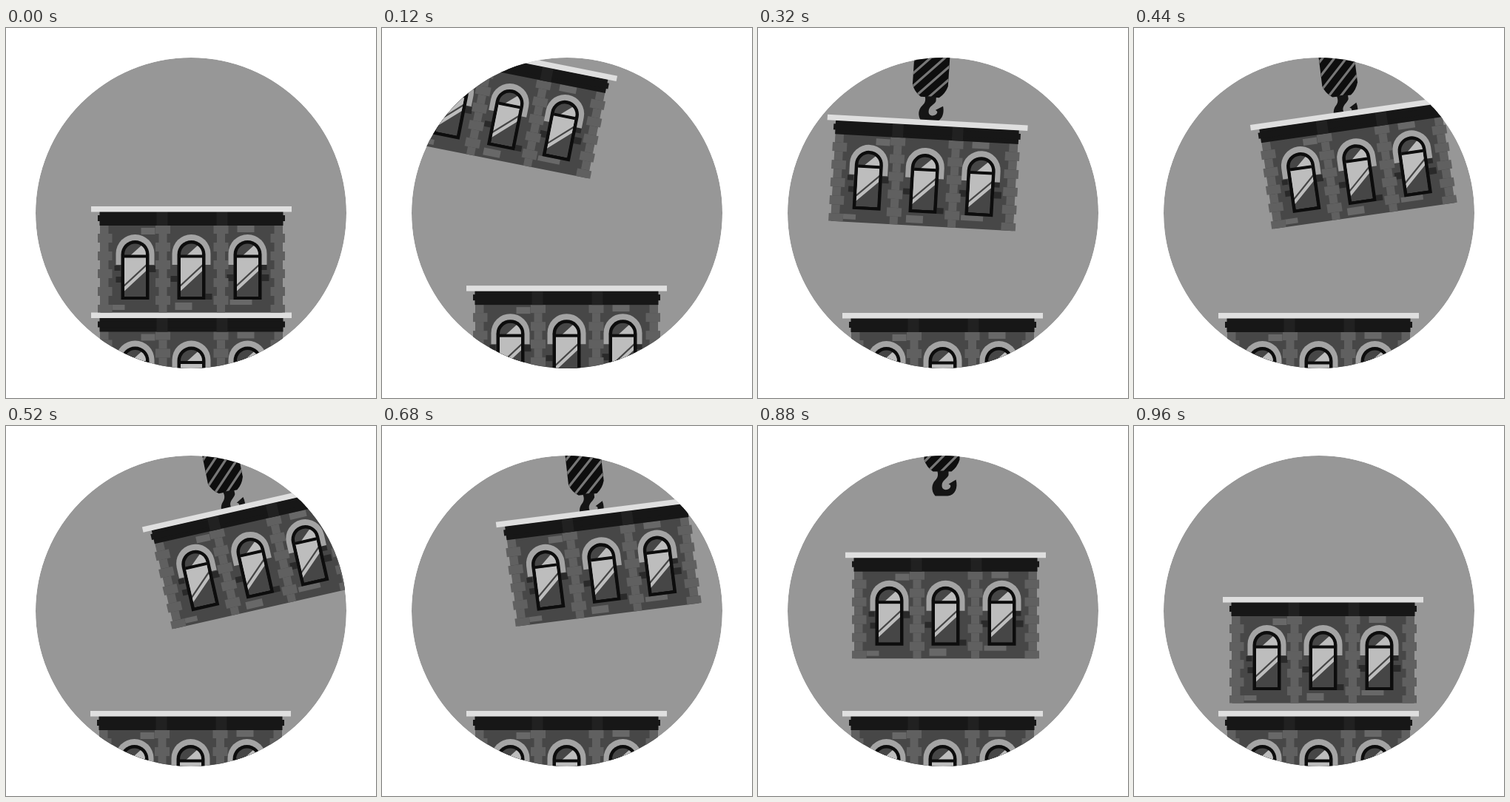
An HTML page for the animation above (1000 ms loop, 500 by 500 pixels).

```html
<!DOCTYPE html>
<html lang="en">
<head>
<meta charset="utf-8">
<title>Stacking floors</title>
<style>
html, body { margin: 0; width: 100%; height: 100%; overflow: hidden; background: #fff; }
svg { display: block; width: 100vw; height: 100vh; }
</style>
</head>
<body>
<svg viewBox="0 0 500 500">
  <defs>
    <clipPath id="disc"><circle cx="250" cy="250" r="210"/></clipPath>
    <clipPath id="tackleShape"><path id="tackle" d="M-24-110H24V-16Q21-6 13 0H-12Q-21-6-24-16Z"/></clipPath>
    <clipPath id="glass"><path d="M-14.5 122V65a14.5 14.5 0 0 1 29 0V122Z"/></clipPath>
    <g id="window">
      <path d="M-26 79V64a26 26 0 0 1 52 0V79Z" fill="#a4a4a4"/>
      <path d="M-19 126V65a19 19 0 0 1 38 0V126Z" fill="#0d0d0d"/>
      <g clip-path="url(#glass)">
        <rect x="-15" y="50" width="30" height="72" fill="#464646"/>
        <path d="M-6 66L15 47V66ZM-15 69H15V78L-15 106ZM-15 109L15 81V87L-15 115Z" fill="#bdbdbd"/>
        <rect x="-15" y="65.5" width="30" height="4" fill="#0d0d0d"/>
      </g>
    </g>
    <g id="floor"></g>
  </defs>
  <g clip-path="url(#disc)">
    <circle cx="250" cy="250" r="210" fill="#979797"/>
    <g id="tower">
      <use href="#floor" y="143.5"/>
      <use href="#floor"/>
    </g>
    <g id="hook">
      <use href="#tackle" fill="#0e0e0e"/>
      <path id="stripes" clip-path="url(#tackleShape)" stroke="#777" stroke-width="3.2"/>
      <path fill="#151515" d="M-6-1H9V5C7 10 0 12 0 19C0 25 6 26 10 23C13 20 12 18 9 17L19 11C22 22 18 32 8 33H-9C-15 26-14 17-9 12C-5 8-5 4-6 0Z"/>
    </g>
    <use id="block" href="#floor"/>
  </g>
</svg>
<script>
const LOOP = 1000, STEP = 40;
const $ = id => document.getElementById(id);
const clamp = v => Math.max(0, Math.min(1, v));
const span = (t, a, b) => clamp((t - a) / (b - a));
const sineInOut = u => (1 - Math.cos(Math.PI * u)) / 2;
const cubicInOut = u => u < .5 ? 4 * u ** 3 : 1 - 4 * (1 - u) ** 3;
const rect = (x, y, w, h, fill) =>
  `<rect x="${x}" y="${y}" width="${w}" height="${h}" fill="${fill}"/>`;

function drawFloor() {
  const wall = '#474747', stone = '#606060', pale = '#686868', dark = '#2a2a2a';
  let s = rect(-123, 24, 246, 119.5, wall);

  // loose bricks: x, y, width, height
  const paleBricks = [[-107, 133, 17, 7], [-22, 130, 23, 10], [52, 126, 30, 7],
    [62, 26, 23, 9], [-68, 29, 19, 9]];
  const darkBricks = [[-102, 95, 9, 8], [-57, 80, 9, 9], [19, 118, 9, 8],
    [95, 92, 10, 9], [-28, 94, 9, 8], [48, 92, 9, 9], [94, 78, 8, 8], [-104, 80, 8, 7]];
  paleBricks.forEach(b => s += rect(...b, pale));
  darkBricks.forEach(b => s += rect(...b, dark));

  // toothed corner stones and pilasters
  for (let i = 0; i < 10; i++) {
    const y = 25 + i * 12, h = Math.min(12, 143.5 - y), wide = i % 2;
    const outer = wide ? 126.5 : 123.5, inner = wide ? 107 : 112;
    s += rect(-outer, y, outer - inner, h, stone) + rect(inner, y, outer - inner, h, stone);
    for (const x of [-38.5, 40]) {
      const half = wide ? 5.5 : 10;
      s += rect(x - half, y, half * 2, h, stone);
    }
  }

  // frieze and cornice
  s += rect(-124, 7, 248, 19, '#171717') + rect(-126.5, 12, 253, 8, '#171717');
  for (const x of [-47, 34]) s += rect(x, 7, 15, 19, '#212121');
  s += rect(-135.5, 0, 271, 7.5, '#dfdfdf');

  for (const x of [-76, 0, 76]) s += `<use href="#window" x="${x}"/>`;
  $('floor').innerHTML = s;
}

function drawStripes() {
  let d = '';
  for (let k = -109; k < 10; k += 18) d += `M${k - 30} 30L${k + 110}-110`;
  $('stripes').setAttribute('d', d);
}

function place(id, x, y, angle = 0) {
  $(id).setAttribute('transform', `translate(${x} ${y}) rotate(${angle})`);
}

function render(t) {
  const towerDrop = 144 * cubicInOut(span(t, 0, 200));
  place('tower', 250.5 - span(t, 0, 120), 241 + towerDrop);

  // swing runs left (-1) to right (1), then settles at the centre
  const first = t < 560;
  const swing = first
    ? -Math.cos(Math.PI * (t - 160) / 400)
    : 1 - sineInOut(span(t, 560, 813));
  const lift = 336 * (1 - span(t, 0, 320)) ** 3;

  const tilt = -12.65 * swing - .75 * (first ? 1 : swing);
  const rise = swing > 0 ? 30 * swing - 10 * swing ** 2 : -6 * swing;
  const fall = 115 * sineInOut(span(t, 790, 1000));
  const drift = 4 * span(t, 800, 960);
  const x = (first ? 250.6 + 68.8 * swing : 251.5 + 67.9 * swing) + drift;
  place('block', x, 126 - rise - lift + fall, tilt);

  // the hook hangs from a pivot above the stage and pulls away at the end
  const hookTilt = -12 * swing, a = hookTilt * Math.PI / 180, rope = 258;
  const retreat = 130 * span(t, 800, 960) ** 2;
  place('hook', 248.5 - rope * Math.sin(a),
    94 - rope * (1 - Math.cos(a)) - lift - retreat, hookTilt);
}

drawFloor();
drawStripes();
const start = performance.now();
function tick() {
  const t = (performance.now() - start) % LOOP;
  render(Math.floor(t / STEP) * STEP);
  requestAnimationFrame(tick);
}
tick();
</script>
</body>
</html>
```
